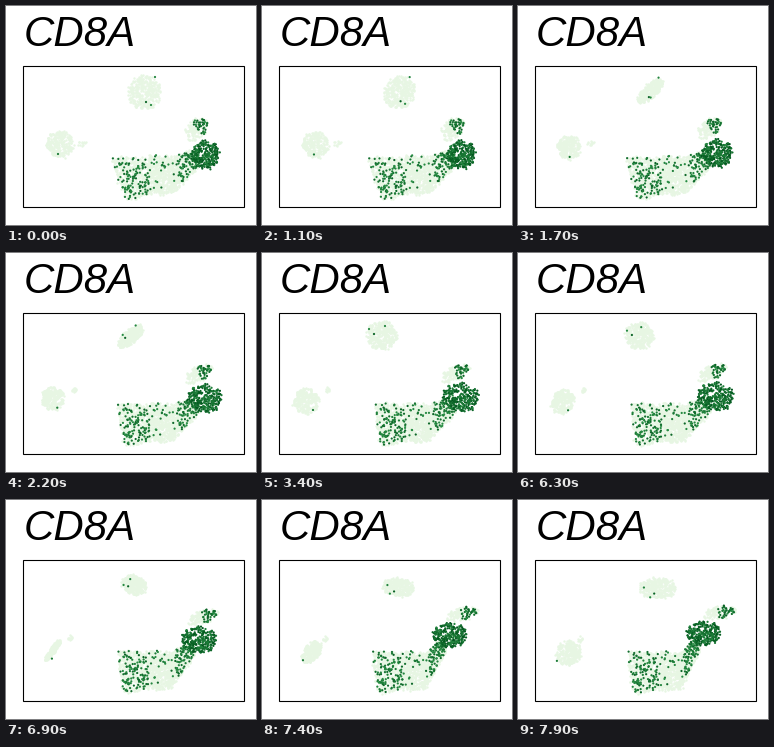
Animation of 250 by 219 pixels, one loop 8000 ms. Source, as a matplotlib script:

```python
import numpy as np
import matplotlib.pyplot as plt
from matplotlib.animation import FuncAnimation
from matplotlib.colors import LinearSegmentedColormap
from matplotlib.patches import Rectangle

W, H, DPI = 250, 219, 64
PT = 72 / DPI  # points per pixel
STEP_MS, FRAMES = 100, 80
MOVE_STEPS = 30
FIRST_MOVE, SECOND_MOVE = 4, 55  # last still frame before each move

rng = np.random.default_rng(8)
PALE = "#e7f6e3"
greens = LinearSegmentedColormap.from_list("cells", ["#2a9046", "#00551c"])


def rot(deg):
    a = np.radians(deg)
    return np.array([[np.cos(a), -np.sin(a)], [np.sin(a), np.cos(a)]])


def mirror(deg):
    """Reflection about a line at the given angle."""
    return rot(2 * deg) @ np.diag([1, -1])


def oval(rx, ry, deg=0):
    return rot(deg) @ np.diag([rx, ry])


def unit_disc(n, power=0.5):
    """Random points in a disc; a higher power crowds the centre."""
    r, a = rng.random(n) ** power, rng.uniform(0, 2 * np.pi, n)
    return np.column_stack([r * np.cos(a), r * np.sin(a)])


def spread(disc, *layouts, fuzz=0.7):
    """Place one disc by a centre and a 2x2 map in each layout."""
    return np.array([np.add(c, disc @ m.T) + rng.normal(0, fuzz, disc.shape)
                     for c, m in layouts])


def band(s, w, start, bend, end, slant):
    """Tapering band along a bent spine; s runs along it, w across."""
    knots = [0, 0.7, 1]
    half = np.interp(s, knots, [20.5, 18, 8]) * (1 + 0.05 * np.sin(15 * s))
    x, y = (np.interp(s, knots, k) for k in zip(start, bend, end))
    points = np.column_stack([x + slant * (1 - s) * w * half, y + w * half])
    return points + rng.normal(0, 0.8, points.shape)


# Islands: the cells turn over or rotate inside them
left = oval(13.5, 13.5)
left_b = rot(60) @ left * 0.94
top = oval(16.5, 17)
top_b = mirror(-42) @ top * 0.9
islands = [
    spread(unit_disc(270), ((54, 138), left), ((44, 148), left_b),
           ((50.3, 153), mirror(-54) @ left_b)),
    spread(unit_disc(12), ((76, 137), oval(5, 2)), ((65.5, 136.5), oval(3, 2)),
           ((62, 139), oval(3, 2))),
    spread(unit_disc(330), ((138, 86), top), ((119.5, 82), top_b),
           ((140, 88), oval(1.3, 0.68) @ rot(-85) @ top_b)),
]

# Main body: expression is strong at the left end, the upper edge and the arm
s, w = rng.random(1600), rng.uniform(-1, 1, 1600)
body = np.array([
    band(s, w, (112, 173), (168, 167), (192, 152), 0.33),
    band(s, w, (115, 171), (167, 169), (193, 151), 0.1),
    band(s, w, (112, 172), (163, 170), (180, 143), 0.1),
])
strength = np.maximum(np.exp(-(s / 0.4) ** 4), (s > 0.75) * 1.0)
strength = np.maximum(strength, np.where(w < -0.4, 0.45, 0.1))
body_on = rng.random(s.size) < 0.21 * strength

# Tip: only its right half expresses
tip_disc = unit_disc(150)
tip = spread(tip_disc, ((190, 123), oval(14, 9, -40)),
             ((193, 120), oval(16, 7, -25)), ((201, 112), oval(17, 6, -8)))
tip_on = (tip_disc[:, 0] > 0) & (rng.random(150) < 0.5)

dense = spread(unit_disc(270, 0.6), ((199.5, 149), oval(14, 14)),
               ((199, 144.5), oval(18, 14, 15)), ((185, 133), oval(17, 12)))

# Lone expressing cells inside the islands
lone = np.array([
    [(52, 148), (149, 71), (140, 96), (145, 99)],
    [(51, 157), (123, 73), (112, 81), (107, 76)],
    [(38.5, 161), (126, 88), (137, 94), (133, 98)],
], float)

pale = np.concatenate([*islands, body[:, ~body_on], tip[:, ~tip_on]], axis=1)
dark = np.concatenate([lone, body[:, body_on], tip[:, tip_on], dense], axis=1)
level = rng.uniform(0, 0.8, dark.shape[1])
level[-dense.shape[1]:] += 0.2

fig = plt.figure(figsize=(W / DPI, H / DPI), dpi=DPI, facecolor="white")
ax = fig.add_axes([0, 0, 1, 1])
ax.set(xlim=(0, W), ylim=(H, 0))
ax.axis("off")

ax.text(17.5, 40.5, "CD8A", family="Liberation Sans", style="italic",
        size=42 * PT, color="black", va="baseline")
ax.add_patch(Rectangle((17, 60), 221, 141, fill=False,
                       ec="black", lw=1.1 * PT))


def dots(layouts, color, px):
    return ax.scatter(*layouts[0].T, s=(px * PT) ** 2, c=color, linewidths=0)


pale_dots = dots(pale, PALE, 2.4)
dark_dots = dots(dark, greens(level), 2.2)


def ease(t):
    """Cubic in and out."""
    t = min(max(t, 0), 1)
    return 4 * t ** 3 if t < 0.5 else 1 - 4 * (1 - t) ** 3


def place(layouts, frame):
    first = ease((frame - FIRST_MOVE) / MOVE_STEPS)
    second = ease((frame - SECOND_MOVE) / MOVE_STEPS)
    a, b, c = layouts
    return a + (b - a) * first + (c - b) * second


def update(frame):
    pale_dots.set_offsets(place(pale, frame))
    dark_dots.set_offsets(place(dark, frame))
    return pale_dots, dark_dots


anim = FuncAnimation(fig, update, frames=FRAMES, interval=STEP_MS,
                     repeat=True, repeat_delay=0, blit=False)
plt.show()
```
